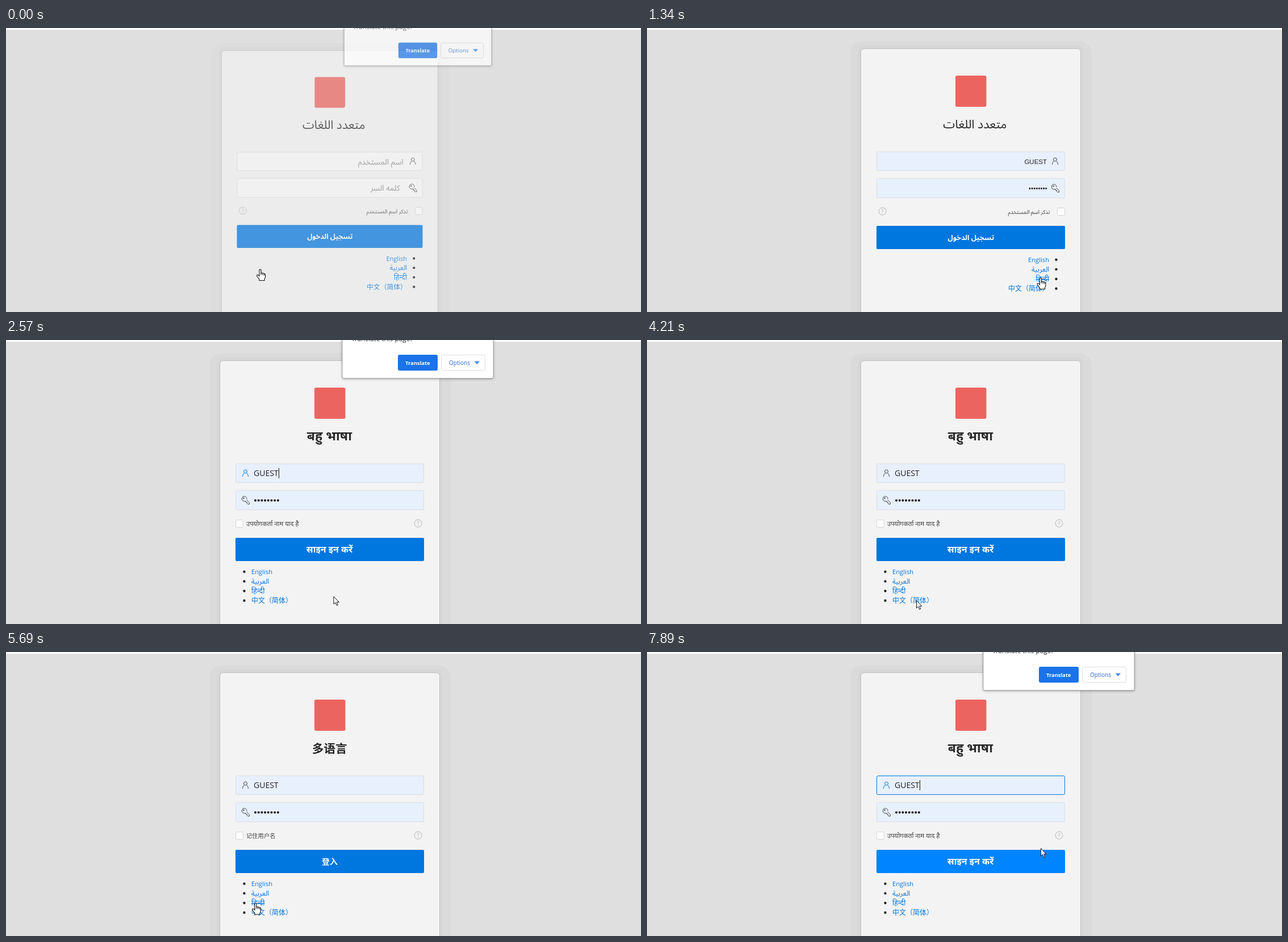
An HTML page with a canvas that plays this animation: 1118 px wide and 501 px high, repeating every 8000 ms.

```html
<!DOCTYPE html>
<html lang="en">
<head>
<meta charset="utf-8">
<title>Multilingual sign-in</title>
<style>
html, body { margin: 0; height: 100%; overflow: hidden; background: #dfdfdf; }
canvas { display: block; }
</style>
</head>
<body>
<canvas id="stage" width="1118" height="501"></canvas>
<script>
const stage = document.getElementById('stage').getContext('2d');
const layerCanvas = document.createElement('canvas');
layerCanvas.width = 1118;
layerCanvas.height = 501;
const layer = layerCanvas.getContext('2d');
let ctx = stage;

const LOOP = 8000;
const SANS = '"Open Sans","Noto Sans","Noto Sans Arabic","Noto Sans Devanagari","Noto Sans CJK SC","DejaVu Sans",sans-serif';
const ARIAL = '"Liberation Sans",sans-serif';
const BLUE = '#0076df', USER = 'GUEST';

// Text entries: [string, size, baseline, weight]
const arabic = {
  rtl: true,
  title: ['متعدد اللغات', 21.2, 177, 500],
  button: ['تسجيل الدخول', 12.5, 374, 700],
  remember: ['تذكر اسم المستخدم', 9.6, 328],
  hints: ['اسم المستخدم', 'كلمه السر']
};
const hindi = {
  title: ['बहु भाषा', 23, 177, 700],
  button: ['साइन इन करें', 16, 375, 700],
  remember: ['उपयोगकर्ता नाम याद है', 11.3, 328],
  hints: ['उपयोगकर्ता नाम', 'पासवर्ड']
};
const chinese = {
  title: ['多语言', 20.5, 177.5, 700],
  button: ['登入', 14, 375, 700],
  remember: ['记住用户名', 10.3, 327.5],
  hints: ['用户名', '密码']
};
const links = [['English', 11.2, 413], ['العربية', 12.3, 430], ['हिन्दी', 12.5, 447], ['中文（简体）', 12, 464]];

// start: page opens, blur: focus is lost and the popup fades until gone
const pages = [
  { start: -180, blur: 1130, gone: 1330, lang: arabic, popup: true },
  { start: 2160, blur: 3300, gone: 3640, lang: hindi, popup: true },
  { start: 4400, blur: 5300, gone: 5400, lang: chinese },
  { start: 6350, blur: 9e9, gone: 9.1e9, lang: hindi, popup: true }
];

// The screen only refreshes in bursts: [first, last, steps]
const bursts = [[120, 1070, 8], [1200, 1340, 2], [2150, 3110, 8], [3390, 3650, 2], [4210, 5170, 8],
  [5300, 5690, 4], [5970, 6930, 8], [7050, 7330, 3], [7760, 7890, 2]];
const refreshes = [0];
for (const [a, b, n] of bursts)
  for (let i = 0; i < n; i++) refreshes.push(Math.floor((a + (b - a) * i / (n - 1)) / 10) * 10);

// [time, x, y, shape]: 0 arrow, 1-4 hand on that link, 9 hand on nothing
const pointer = [
  [0, 447.5, 425.5, 9], [250, 447.5, 425.5, 0], [1070, 693, 440.5, 3], [2150, 693, 440.5, 0],
  [2290, 693, 440.5, 0], [2560, 576.5, 452, 0], [3110, 474, 459, 4], [4210, 474, 459, 0],
  [4480, 474, 459, 0], [5170, 452, 445, 0], [5430, 439.5, 443, 3], [5970, 439.5, 443, 0],
  [6390, 439.5, 443, 0], [6790, 504.5, 428, 0], [6930, 590, 381, 0], [7330, 688, 365, 0],
  [7760, 688, 365, 0], [7890, 693, 346, 0], [LOOP, 693, 346, 0]
];

const clamp = v => Math.max(0, Math.min(1, v));
const ease = u => 1 - (1 - clamp(u)) ** 2;

function box(x, y, w, h, r, fill, stroke) {
  ctx.beginPath();
  ctx.roundRect(x, y, w, h, r);
  if (fill) { ctx.fillStyle = fill; ctx.fill(); }
  if (stroke) { ctx.strokeStyle = stroke; ctx.lineWidth = 1; ctx.stroke(); }
}

function dot(x, y, r, fill) {
  ctx.fillStyle = fill;
  ctx.beginPath();
  ctx.arc(x, y, r, 0, 7);
  ctx.fill();
}

// Centred text is centred by its visible ink
function text([string, size, y, weight = 400], x, color, align = 'left', family = SANS) {
  ctx.font = `${weight} ${size}px ${family}`;
  ctx.textAlign = align;
  ctx.fillStyle = color;
  if (align === 'center') {
    const ink = ctx.measureText(string);
    x += (ink.actualBoundingBoxLeft - ink.actualBoundingBoxRight) / 2;
  }
  ctx.fillText(string, x, y);
}

function shape(d, x, y, stroke, fill, width = 1) {
  const path = new Path2D(d);
  ctx.save();
  ctx.translate(x, y);
  if (fill) { ctx.fillStyle = fill; ctx.fill(path); }
  ctx.strokeStyle = stroke;
  ctx.lineWidth = width;
  ctx.stroke(path);
  ctx.restore();
}

// Draws on a layer scaled about a point, then fades the layer as a whole
function group(x, y, scale, alpha, draw) {
  ctx = layer;
  ctx.clearRect(0, 0, 1118, 501);
  ctx.save();
  ctx.translate(x, y);
  ctx.scale(scale, scale);
  ctx.translate(-x, -y);
  draw();
  ctx.restore();
  ctx = stage;
  ctx.globalAlpha = alpha;
  ctx.drawImage(layerCanvas, 0, 0);
  ctx.globalAlpha = 1;
}

function drawFields(page, t, at, side) {
  const { rtl, hints } = page.lang;
  const age = t - page.start;
  const filled = age >= 300;
  const focused = filled && t < page.blur;
  const fill = filled ? '#e8f0fe' : '#f9f9f9';
  const edge = '#dadee5';
  box(404.5, 218.5, 331, 33, 2, fill, focused && age > 420 ? BLUE : edge);
  box(404.5, 265.5, 331, 34, 2, fill, edge);

  shape('M3 -3A3 3 0 1 1 -3 -3A3 3 0 1 1 3 -3M-5 6Q-4.7 1 -2 .2M2 .2Q4.7 1 5 6',
    at(421.5), 235, focused ? BLUE : '#444');
  shape('M2.5 -2A4.4 4.4 0 1 0 -1.5 2L1 2V4H3V6L4 7H7V4.5L2.2 -.5M-3 -4.5A1 1 0 1 0 -3 -2.5A1 1 0 1 0 -3 -4.5',
    at(421.5), 282.5, '#444');

  if (!filled) {
    hints.forEach((hint, i) => text([hint, 14, 241 + 47 * i], at(436), '#888', side));
    return;
  }
  text([USER, rtl ? 11.5 : 14, 240], at(436), '#222', side, rtl ? ARIAL : SANS);
  for (let i = 0; i < 8; i++)
    dot(rtl ? 674 + 4.1 * i : 439 + 5.7 * i, 283, rtl ? 1.5 : 2, '#111');
  if (focused && Math.floor((age - 300) / 530) % 2 === 0) {
    ctx.fillStyle = '#111';
    ctx.fillRect(rtl ? 664 : 480, 226, 1, 18);
  }
}

function drawCard(page, t, hovered) {
  const { rtl, title, button, remember } = page.lang;
  const at = x => rtl ? 1140 - x : x;
  const side = rtl ? 'right' : 'left';

  box(358, 23, 425, 600, 22, 'rgba(0,0,0,.018)');
  box(371, 31, 398, 600, 12, 'rgba(0,0,0,.015)');
  box(376.5, 36.5, 387, 560, 6, '#f3f3f3', '#c0c0c0');
  box(543, 84, 54.5, 55, 3, '#ec645f');
  text(title, 570, '#262626', 'center');
  drawFields(page, t, at, side);

  box(at(411) - 6.5, 317.5, 13, 13, 2, '#fdfdfd', '#d4d4d4');
  text(remember, at(423), '#404040', side);
  ctx.strokeStyle = '#b8b8b8';
  ctx.beginPath();
  ctx.arc(at(725.5), 323.5, 6.5, 0, 7);
  ctx.stroke();
  text(['?', 9, 327], at(725.5), '#aaa', 'center');

  const lit = clamp((t - 6930) / 200);
  box(404, 349, 332, 41, 2, `rgb(0,${118 + 14 * lit},${223 + 32 * lit})`);
  text(button, 570, '#fff', 'center');

  links.forEach((link, i) => {
    dot(at(419.5), link[2] - 4.2, 2.2, '#222');
    text(link, at(432), BLUE, side);
    if (hovered === i + 1) {
      const width = ctx.measureText(link[0]).width;
      ctx.fillRect(rtl ? 708 - width : 432, link[2] - (i === 2 ? 4 : -1), width, 1);
    }
  });
}

function drawPopup() {
  ctx.save();
  ctx.shadowColor = 'rgba(0,0,0,.4)';
  ctx.shadowBlur = 4;
  ctx.shadowOffsetY = 1;
  box(592, -60, 266, 127.5, 2, '#fff');
  ctx.restore();
  box(592, -60, 266, 127.5, 2, null, '#a5a5a5');
  text(['Translate this page?', 11.8, 2], 608, '#333');
  box(690, 26, 70, 28, 3, '#1a73e8');
  text(['Translate', 9.4, 43.5, 700], 725, '#fff', 'center');
  box(766.5, 26.5, 77, 27, 3, '#fff', '#dadce0');
  text(['Options', 10, 43.5], 780, '#2b66d0');
  ctx.fillStyle = '#4a8bea';
  ctx.fill(new Path2D('M824.5 37.5H834L829.2 43Z'));
}

function drawPointer(x, y, hand) {
  if (hand) {
    shape('M-1.5 1.2Q0 -.6 1.5 1.2V7Q3.2 5.6 4.3 7.5Q6 6.3 7 8.2Q8.8 7.6 9 9.5V13Q9 15.5 7.5 17.5V20H-1.5V18' +
      'L-5.5 12.5Q-6.5 10.5 -5 10Q-3.5 10 -1.5 12ZM1.5 7V10M4.3 7.5V10.5M7 8.2V11', x, y, '#111', '#fff', 1.1);
  } else {
    shape('M.5 .5V14L3.5 11.2L5.7 16.3L7.8 15.4L5.7 10.4H9.8Z', x, y, '#111', '#fff');
  }
}

function render(now) {
  const t = refreshes.filter(r => r <= now).pop();
  const page = pages.filter(p => p.start <= t).pop();
  const step = pointer.filter(p => p[0] <= t).length - 1;
  const [t0, x0, y0, kind] = pointer[step];
  const [t1, x1, y1] = pointer[step + 1];
  const move = (t - t0) / (t1 - t0);
  const shown = ease((t - page.start) / 400);

  ctx.fillStyle = '#dfdfdf';
  ctx.fillRect(0, 0, 1118, 501);
  ctx.fillStyle = '#fdfdfd';
  ctx.fillRect(0, 0, 1118, 3);
  group(570, 250, .95 + .05 * shown, shown, () => drawCard(page, t, kind));
  const visible = shown * clamp((page.gone - t) / (page.gone - page.blur));
  if (page.popup && visible > 0) group(725, 20, .92 + .08 * shown, visible, drawPopup);
  drawPointer(x0 + (x1 - x0) * move, y0 + (y1 - y0) * move, kind);
}

function tick() {
  render(performance.now() % LOOP);
  requestAnimationFrame(tick);
}
tick();
</script>
</body>
</html>
```
